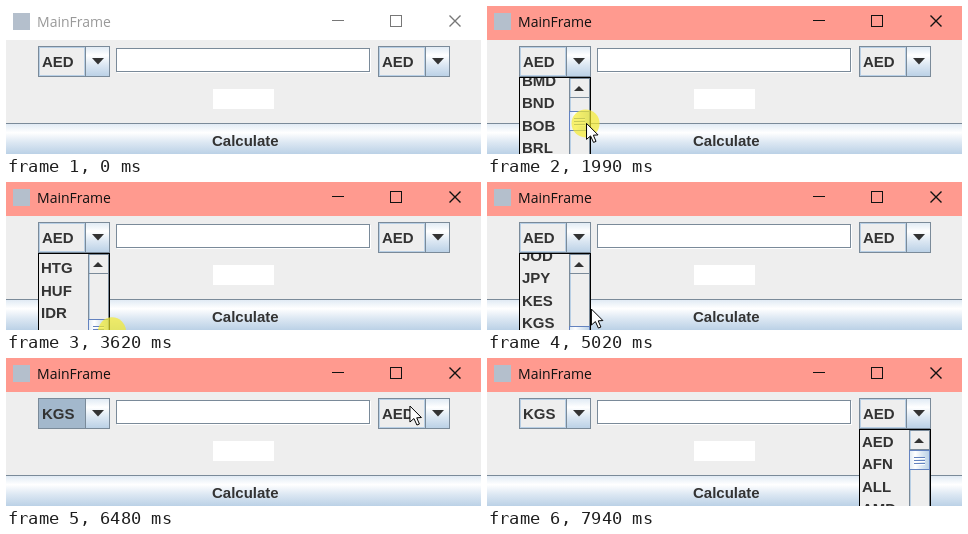
Recreate the animation shown at these times as an HTML page with a canvas. Size 475 px wide and 148 px high, loop 8 s.

```html
<!DOCTYPE html>
<html>
<head>
<meta charset="utf-8">
<style>
  html, body { margin: 0; width: 100%; height: 100%; overflow: hidden; }
  canvas { display: block; }
</style>
</head>
<body>
<canvas id="stage" width="475" height="148"></canvas>
<script>
const ctx = document.getElementById('stage').getContext('2d');
const LOOP = 8000, STEP = 76.6, ROW = 22.5, LIST_TOP = 72, THUMB_RATE = .035;
const EDGE = '#7a8a99', PANEL = '#eee', INK = '#333', SELECTED = '#a3b8cc', SKY = '#b8cfe5', PALE = '#dde8f3', GRIP = '#6382bf';
const OPEN_LEFT = 910, GRAB = 1300, RELEASE = 5020, CHOOSE = 5710, CLOSE_LEFT = 5790, OPEN_RIGHT = 6940;
const codes = ('AED AFN ALL AMD ANG AOA ARS AUD AWG AZN BAM BBD BDT BGN BHD BIF BMD BND BOB BRL BSD BTN BWP BYN BZD ' +
  'CAD CDF CHF CLP CNY COP CRC CUC CUP CVE CZK DJF DKK DOP DZD EGP ERN ETB EUR FJD FKP GBP GEL GHS GIP GMD GNF GTQ GYD ' +
  'HKD HNL HRK HTG HUF IDR ILS INR IQD IRR ISK JMD JOD JPY KES KGS KHR KMF').split(' ');

// Pointer moves: start, end, then the point reached
const moves = [
  [530, 900, 95, 53], [1070, GRAB, 93, 104.5], [1380, 2660, 107, 104.5], [4950, RELEASE, 100, 165],
  [5250, 5480, 62, 136], [CLOSE_LEFT, 6440, 404, 48], [6480, 6640, 428, 54], [7330, 7900, 402, 165]
];

const within = (t, a, b) => t >= a && t < b;
const ramp = (t, a, b) => Math.min(1, Math.max(0, (t - a) / (b - a)));
const ease = p => p * p * (3 - 2 * p);

// Three pulls on the scroll thumb with pauses between
const scrollAt = t => 747 * ramp(t, 1340, 2660) + 533 * ramp(t, 2780, 3540) + 215 * ramp(t, 4030, 4750);

function pointerAt(t) {
  let x = 130, y = 160;
  for (const [start, end, toX, toY] of moves) {
    const p = ease(ramp(t, start, end));
    x += (toX - x) * p;
    y += (toY - y) * p;
  }
  return [x, y];
}

function fill(x, y, w, h, color) {
  ctx.fillStyle = color;
  ctx.fillRect(x, y, w, h);
}

function frame(x, y, w, h, color = EDGE, width = 1) {
  ctx.strokeStyle = color;
  ctx.lineWidth = width;
  ctx.strokeRect(x + width / 2, y + width / 2, w - width, h - width);
}

function text(str, x, y, color = INK, font = 'bold 15px "Liberation Sans", Arial, sans-serif') {
  ctx.font = font;
  ctx.fillStyle = color;
  ctx.fillText(str, x, y);
}

function shape(points, color) {
  ctx.beginPath();
  points.forEach(p => ctx.lineTo(...p));
  ctx.closePath();
  ctx.fillStyle = color;
  ctx.fill();
}

function gloss(x, y, w, h, horizontal) {
  const g = horizontal ? ctx.createLinearGradient(x, 0, x + w, 0) : ctx.createLinearGradient(0, y, 0, y + h);
  [PALE, '#fff', PALE, SKY].forEach((c, i) => g.addColorStop(Math.min(1, i * .3 + (i === 3)), c));
  fill(x, y, w, h, g);
}

function titleBar(active) {
  const ink = active ? '#111' : '#777';
  fill(0, 0, 475, 34, active ? '#ff9a8f' : '#fff');
  fill(7, 7, 17, 17, '#b4bfcc');
  text('MainFrame', 31, 21, active ? '#111' : '#999', '14px "Open Sans", sans-serif');
  fill(326, 14, 12, 1, ink);
  frame(384, 9, 12, 12, ink);
  ctx.lineWidth = 1.4;
  ctx.beginPath();
  ctx.moveTo(443.5, 9.5); ctx.lineTo(454.5, 20.5);
  ctx.moveTo(454.5, 9.5); ctx.lineTo(443.5, 20.5);
  ctx.stroke();
}

function combo(x, label, focused, pressed) {
  gloss(x, 40, 72, 31);
  if (pressed) fill(x + 48, 41, 23, 29, SELECTED);
  fill(x + 1, 41, 46, 29, focused ? SELECTED : PANEL);
  if (!focused) frame(x + 1, 41, 46, 29, SKY);
  frame(x, 40, 72, 31);
  fill(x + 47, 41, 1, 29, EDGE);
  shape([[x + 54, 52], [x + 66, 52], [x + 60, 58.5]], INK);
  text(label, x + 4, 61);
}

function textField() {
  fill(111, 43, 254, 24, '#fff');
  frame(110, 42, 254, 24);
}

function scrollBar(x, scroll) {
  fill(x, 72, 1, 76, EDGE);
  fill(x + 1, 72, 1, 76, SKY);
  fill(x + 20, 72, 1, 76, EDGE);
  frame(x, 72, 21, 20);
  shape([[x + 5, 85], [x + 15, 85], [x + 10, 80]], INK);

  const top = Math.round(92 + scroll * THUMB_RATE);
  gloss(x, top, 21, 20, true);
  frame(x, top, 21, 20, GRIP);
  for (let y = top + 7; y < top + 15; y += 3) {
    fill(x + 5, y, 11, 1, GRIP);
    fill(x + 5, y + 1, 11, 1, '#fff');
  }
}

function popup(x, scroll, selected) {
  fill(x, 71, 72, 90, PANEL);
  ctx.save();
  ctx.beginPath();
  ctx.rect(x + 1, 72, 49, 80);
  ctx.clip();
  codes.forEach((code, i) => {
    const y = Math.floor(LIST_TOP + i * ROW - scroll);
    if (i === selected) fill(x + 1, y, 49, ROW, SELECTED);
    text(code, x + 3, y + 17);
  });
  ctx.restore();
  scrollBar(x + 50, scroll);
  frame(x, 71, 72, 90, '#000');
}

function pointer(x, y, pressed) {
  if (pressed) {
    ctx.beginPath();
    ctx.arc(x - 1, y, 14, 0, 7);
    ctx.fillStyle = 'rgba(246,236,40,.68)';
    ctx.fill();
  }
  const arrow = [[0, 0], [0, 16], [4, 12.5], [7, 19], [9.5, 18], [6.8, 11.8], [11.5, 11.5]];
  shape(arrow.map(([dx, dy]) => [x + dx, y + dy]), '#fff');
  ctx.strokeStyle = '#000';
  ctx.lineWidth = 1;
  ctx.stroke();
}

function draw(t) {
  const q = Math.floor((t + 5) / STEP) * STEP;
  const scroll = scrollAt(q);
  let [x, y] = pointerAt(q);
  const dragging = within(t, GRAB, RELEASE);
  if (dragging) y += scroll * THUMB_RATE;

  const leftOpen = within(t, OPEN_LEFT, CLOSE_LEFT), rightOpen = t >= OPEN_RIGHT, chosen = t >= CLOSE_LEFT;
  const leftClick = within(t, OPEN_LEFT, OPEN_LEFT + 230), rightClick = within(t, OPEN_RIGHT, OPEN_RIGHT + 160);
  const pressed = dragging || leftClick || rightClick || within(t, CHOOSE, CHOOSE + 150);

  fill(0, 0, 475, 148, PANEL);
  titleBar(t >= OPEN_LEFT);
  combo(32, chosen ? 'KGS' : 'AED', chosen && !rightOpen, leftClick);
  combo(372, 'AED', false, rightClick);
  textField();
  fill(207, 83, 61, 20, '#fff');

  gloss(0, 117, 475, 32);
  if (within(y, 117, 148) && !leftOpen && !rightOpen) frame(0, 118, 475, 32, SKY, 2);
  fill(0, 117, 475, 1, EDGE);
  text('Calculate', 206, 140);

  if (leftOpen) popup(32, scroll, t < 5330 ? 0 : codes.indexOf('KGS'));
  if (rightOpen) popup(372, 0, Math.max(0, Math.floor((y - LIST_TOP) / ROW)));
  if (t >= 530) pointer(x, y, pressed);
}

function tick() {
  draw(performance.now() % LOOP);
  requestAnimationFrame(tick);
}
tick();
</script>
</body>
</html>
```
